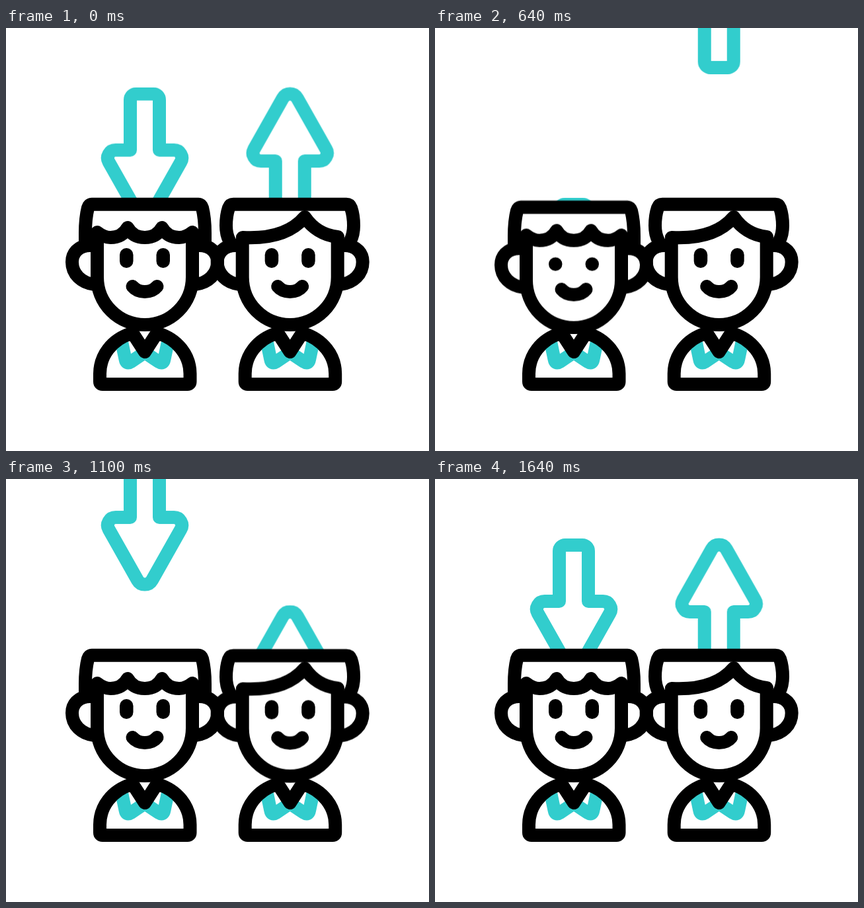
These frames come from a looping animation (640 px wide and 640 px high, 3.6 s). An HTML page:

```html
<!DOCTYPE html>
<html lang="en">
<head>
<meta charset="utf-8">
<title>Exchange</title>
<style>
  html, body { margin: 0; width: 100%; height: 100%; overflow: hidden; background: #fff; }
  svg { display: block; width: 100vw; height: 100vh; }
  .line { fill: none; stroke: #000; stroke-width: 20; stroke-linecap: round; stroke-linejoin: round; }
  .teal { stroke: #32cdcd; }
  .eye { stroke: none; fill: #000; }
</style>
</head>
<body>
<svg viewBox="0 0 640 640">
  <defs>
    <clipPath id="above"><rect width="640" height="268"/></clipPath>
    <path id="arrow" d="M166 185H188V109A9 9 0 0 1 197 100H223A9 9 0 0 1 232 109V185H254A12 12 0 0 1 264.5 203L221 280A12.6 12.6 0 0 1 199 280L155.5 203A12 12 0 0 1 166 185Z"/>
    <g id="body">
      <path class="teal" d="M175.5 477L180.5 501Q182 509.5 189 505L210 491L231 505Q238 509.5 239.5 501L244.5 477"/>
      <path d="M192.5 463L210 490L227.5 463M190 462C160 471 142 496 142 523V535Q142 539 146 539H274.5Q278.5 539 278.5 535V523C278.5 496 260 471 230 462"/>
    </g>
    <g id="face">
      <path d="M138 318V377A72 72 0 0 0 282 377V318"/>
      <path d="M128 329C108 329 100 342 100 354C100 372 114 386 134 388M292 329C312 329 320 342 320 354C320 372 306 386 286 388"/>
      <path d="M191.5 391C200 401.5 220 401.5 228.5 391"/>
    </g>
  </defs>

  <g class="line">
    <g clip-path="url(#above)">
      <g id="down" class="teal"><use href="#arrow"/></g>
      <g id="up" class="teal"><use href="#arrow" transform="matrix(1 0 0 -1 219.7 386)"/></g>
    </g>

    <use href="#body"/>
    <use href="#body" x="219.7"/>

    <g id="left">
      <use href="#face"/>
      <path d="M120 326V310Q120 288 124 272Q125.500 266.700 130 266.700H291Q295.500 266.700 297 272Q301 288 301 310V326"/>
      <path d="M138 318V309Q148 317 158 317Q176 317 184 302Q192 317 210 317Q228 317 236 302Q244 317 262 317Q272 317 282 309V318"/>
      <rect class="eye" x="172" y="333" width="20.5" height="30" rx="10.2"/>
      <rect class="eye" x="227.5" y="333" width="20.5" height="30" rx="10.2"/>
    </g>

    <g id="right">
      <use href="#face" x="219.7"/>
      <path d="M338 322Q333 312 333 299Q333 284 337 272Q339 266.700 344 266.700H515Q520 266.700 522 272Q526 284 526 299Q526 312 521 322"/>
      <path d="M358 317C395 319 430 312 452 286C463 302 480 314 502 316"/>
      <rect class="eye" x="391.7" y="333" width="20.5" height="30" rx="10.2"/>
      <rect class="eye" x="447.2" y="333" width="20.5" height="30" rx="10.2"/>
    </g>
  </g>
</svg>
<script>
  const LOOP = 3600;
  const EASE = 'cubic-bezier(.3333, 0, .6667, 1)';

  // Each step is [ms, value]; two steps at one time make a jump.
  function play(el, steps, pose) {
    const frames = steps.map(([ms, v]) => ({ offset: ms / LOOP, easing: EASE, ...pose(v) }));
    const anim = el.animate(frames, { duration: LOOP, iterations: Infinity });
    anim.startTime = document.timeline.currentTime;
  }

  const shift = y => ({ transform: `translateY(${y}px)` });
  const squint = k => ({ y: `${333 + 9.5 * k}px`, height: `${30 - 9.5 * k}px` });
  const get = id => document.getElementById(id);

  play(get('down'), [
    [0, 0], [360, -13.5], [740, 203], [740, -301], [1455, 42], [1640, 0], [LOOP, 0]
  ], shift);

  play(get('up'), [
    [0, 0], [360, 13.5], [775, -304], [775, 184], [826, 184], [1460, -21.5], [1640, 0], [LOOP, 0]
  ], shift);

  function nod(id, start, low, end) {
    const steps = [[0, 0], [start, 0], [low, 1], [end, 0], [LOOP, 0]];
    const head = get(id);
    play(head, steps, k => shift(4.5 * k));
    head.querySelectorAll('.eye').forEach(eye => play(eye, steps, squint));
  }

  nod('left', 360, 640, 920);
  nod('right', 1000, 1480, 1640);
</script>
</body>
</html>
```
